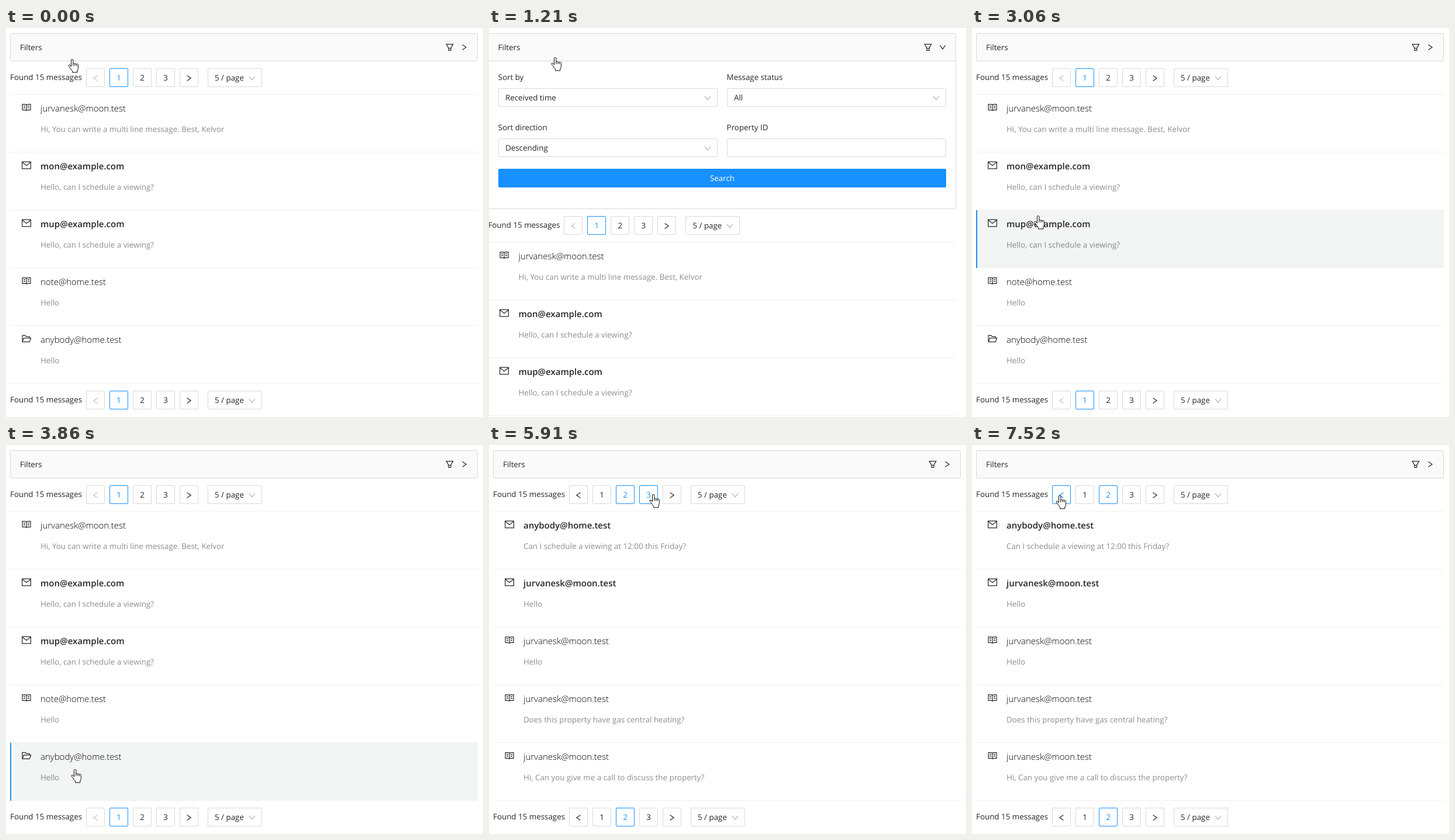
An HTML page for the animation above (8000 ms loop, 816 by 666 pixels).

```html
<!DOCTYPE html>
<html lang="en">
<head>
<meta charset="utf-8">
<title>Messages</title>
<style>
  html, body { margin: 0; width: 100%; height: 100%; overflow: hidden; background: #fff; }
  body { position: relative; font: 13.36px/20px "Open Sans", "Noto Sans", sans-serif; color: rgba(0,0,0,.85); text-rendering: geometricPrecision; }
  div, svg { position: absolute; box-sizing: border-box; white-space: nowrap; }
  svg { fill: none; stroke: currentColor; stroke-width: 1.2; overflow: visible; }
  #list { left: 0; top: 0; width: 816px; height: 666px; }
  #panel { left: 7px; top: 9px; width: 800px; height: 48px; border: 1px solid #d9d9d9; border-radius: 2px; background: #fff; overflow: hidden; }
  .head { left: 0; top: 0; width: 100%; height: 47px; background: #fafafa; border-bottom: 1px solid #d9d9d9; }
  .box { height: 32px; border: 1px solid #d9d9d9; border-radius: 2px; background: #fff; line-height: 30px; }
  .btn { width: 32px; text-align: center; }
  .btn svg { left: 8px; top: 9px; }
  .off { color: rgba(0,0,0,.25); }
  .on { color: #1890ff; border-color: #1890ff; }
  .drop { color: rgba(0,0,0,.28); }
  .search { background: #1890ff; border-color: #1890ff; color: #fff; text-align: center; }
  .line { left: 7px; width: 800px; height: 1px; background: #f0f0f0; }
  .row { left: 7px; width: 800px; height: 99px; border-bottom: 1px solid #f0f0f0; }
  .row svg { left: 20px; top: 14px; }
  .hover { background: #f3f5f4; }
  .hover::before { content: ""; position: absolute; left: 0; top: 0; width: 2px; height: 99px; background: #1890ff; }
  .title { left: 52px; top: 14px; font-size: 15px; font-weight: 300; color: #000; }
  .mail .title { font-weight: 600; color: rgba(0,0,0,.85); }
  .note { left: 52px; top: 49px; color: rgba(0,0,0,.45); }
  #cursor { left: 0; top: 0; color: #000; stroke-width: 1; }
  #cursor path { fill: #fff; }
</style>
</head>
<body>
<div id="list"></div>
<div id="panel"></div>
<svg id="cursor" width="20" height="26">
  <g id="hand" transform="translate(-7 -1)">
    <path d="M5.5 13V2.3a1.7 1.7 0 0 1 3.4 0V8.4a1.6 1.6 0 0 1 3 .4a1.5 1.5 0 0 1 2.8.7a1.4 1.4 0 0 1 2.7 1V15.5q0 2.5-1.6 4.6V23H7.6V20.6Q5.5 18.5 4 15.6L1.3 12.4q-.9-1.6.3-2.2q1.2-.5 2.4.9z"/>
    <path d="M8.9 8.4v3.4M11.9 8.8v3M14.7 9.5v2.3"/>
  </g>
  <path id="arrow" d="M.5.5V16.5l3.7-3.6 2.4 5.6 2.6-1.1-2.4-5.5h5.2z"/>
</svg>
<script>
const $ = id => document.getElementById(id);

const shapes = {
  read: 'M1 2.7h4.5q2 0 2.5 1q.5-1 2.5-1H15v9.6h-4.6q-1.9 0-2.4.9q-.5-.9-2.4-.9H1zM8 3.7v9M3 5.7h3M3 8.6h3M10 5.7h3M10 8.6h3',
  mail: 'M.6 2.1h14.8v11.8H.6zM1 3l7 5.5L15 3',
  folder: 'M1 13.4V2.4h4.8l2 2h5.4v2.4M1 13.4L3.4 6.8H15.6L13.2 13.4z',
  funnel: 'M1.2 1.8h11.6L9 8.2v4.2H5V8.2zM5 8.6h4',
  next: 'M3.6 2.4l6.6 4.6-6.6 4.6',
  prev: 'M10.4 2.4l-6.6 4.6 6.6 4.6',
  down: 'M2 4l5 6 5-6'
};
const icon = (name, attrs = '', size = 14) =>
  `<svg width="${size}" height="${size}" ${attrs}><path d="${shapes[name]}"/></svg>`;
const at = (x, y) => `style="left:${x}px;top:${y}px"`;
const text = (x, baseline, s) => `<div ${at(x, baseline - 15)}>${s}</div>`;

const jurvan = 'jurvanesk@moon.test';
const anybody = 'anybody@home.test';
const viewing = 'Hello, can I schedule a viewing?';
const pages = [
  [
    ['read', jurvan, 'Hi, You can write a multi line message. Best, Kelvor'],
    ['mail', 'mon@example.com', viewing],
    ['mail', 'mup@example.com', viewing],
    ['read', 'note@home.test', 'Hello'],
    ['folder', anybody, 'Hello']
  ], [
    ['mail', anybody, 'Can I schedule a viewing at 12:00 this Friday?'],
    ['mail', jurvan, 'Hello'],
    ['read', jurvan, 'Hello'],
    ['read', jurvan, 'Does this property have gas central heating?'],
    ['read', jurvan, 'Hi, Can you give me a call to discuss the property?']
  ], [
    ['read', jurvan, 'Hello'],
    ['read', jurvan, 'Hello, Can you give me a call to discuss the property? Does this property have gas central heating?'],
    ['read', jurvan, viewing],
    ['read', jurvan, 'Hello'],
    ['read', jurvan, 'Hello']
  ]
];

const rowTop = i => 114 + 99 * i;
const btnLeft = i => 137 + 40 * i;

function pager(y) {
  const labels = [icon('prev'), 1, 2, 3, icon('next')];
  return text(7, y + 20, 'Found 15 messages') +
    labels.map((s, i) => `<div class="box btn" ${at(btnLeft(i), y)}>${s}</div>`).join('') +
    `<div class="box" style="left:345px;top:${y}px;width:93px;padding-left:11px">5 / page` +
    icon('down', 'class="drop" style="left:68px;top:9px"') + '</div>';
}

function rows(list) {
  return '<div class="page">' + list.map(([kind, from, note], i) =>
    `<div class="row ${kind}" style="left:7px;top:${rowTop(i)}px">${icon(kind, '', 16)}` +
    `<div class="title">${from}</div><div class="note">${note}</div></div>`).join('') + '</div>';
}

function field(x, y, label, value) {
  return text(x - .4, y, label) +
    `<div class="box" style="left:${x}px;top:${y + 14}px;width:375px;padding-left:11px">${value}` +
    (value && icon('down', 'class="drop" style="left:350px;top:9px"')) + '</div>';
}

$('list').innerHTML = pager(69) + '<div class="line" style="top:113px"></div>' +
  pages.map(rows).join('') + pager(621);

$('panel').innerHTML = '<div class="head"></div>' + text(16, 28, 'Filters') +
  icon('funnel', at(744, 16)) + icon('next', 'id="caret" ' + at(769, 16)) +
  field(16.4, 79, 'Sort by', 'Received time') + field(407.4, 79, 'Message status', 'All') +
  field(16.4, 165, 'Sort direction', 'Descending') + field(407.4, 165, 'Property ID', '') +
  '<div class="box search" style="left:16.4px;top:231px;width:766px">Search</div>';

const pageEls = [...document.querySelectorAll('.page')];
const buttons = [...document.querySelectorAll('.btn')];

const loop = 8000, tick = 203;
const path = [
  [0, 113, 54], [1, 113, 54], [2, 113, 51], [10, 113, 51], [11, 113, 66], [13, 113, 180],
  [15, 113, 322], [16, 113, 440], [17, 114, 540], [18, 116, 560], [19, 118, 556],
  [20, 150, 530], [23, 205, 104], [24, 226, 84], [25, 231, 82], [27, 233, 80],
  [28, 262, 84], [29, 281, 85], [30, 281, 85], [31, 282, 86], [33, 282, 86],
  [36, 152, 86], [37, 150, 87], [40, 150, 87]
];

const ease = p => {
  p = Math.min(1, Math.max(0, p));
  return p * p * (3 - 2 * p);
};

function cursorAt(k) {
  const i = path.findIndex((p, n) => n && p[0] >= k);
  const [a, ax, ay] = path[i - 1], [b, bx, by] = path[i];
  const f = (k - a) / (b - a);
  return [Math.round(ax + (bx - ax) * f), Math.round(ay + (by - ay) * f)];
}

function draw(k) {
  const [x, y] = cursorAt(k);
  const open = ease((k - 2) / 4) - ease((k - 7) / 3);
  const page = k < 26 ? 0 : k < 32 || k > 36 ? 1 : 2;
  const drop = Math.round(253 * open);

  $('panel').style.left = (open ? -1.4 : 7) + 'px';
  $('panel').style.height = 48 + drop + 'px';
  $('caret').style.transform = `rotate(${90 * open}deg)`;
  $('list').style.left = (open ? -8.6 : 0) + 'px';
  $('list').style.top = drop + 'px';

  let pointing = y > 9 && y < 57;
  buttons.forEach((el, n) => {
    const i = n % 5;
    const off = i === 0 && page === 0;
    const over = n < 5 && y >= 69 && y < 101 && x >= btnLeft(i) && x < btnLeft(i) + 32;
    pointing = pointing || over;
    el.classList.toggle('off', off);
    el.classList.toggle('on', i === page + 1 || (over && !off));
  });
  pageEls.forEach((el, n) => {
    el.style.display = n === page ? 'block' : 'none';
    [...el.children].forEach((row, i) => {
      const over = !open && y >= rowTop(i) && y < rowTop(i + 1);
      pointing = pointing || over;
      row.classList.toggle('hover', over);
    });
  });

  $('cursor').style.transform = `translate(${x}px, ${y}px)`;
  $('hand').style.display = pointing ? '' : 'none';
  $('arrow').style.display = pointing ? 'none' : '';
}

let last = -1;
const start = performance.now();
function frame() {
  const t = (performance.now() - start) % loop;
  const k = Math.floor((t + 10) / tick);
  if (k !== last) draw(last = k);
  requestAnimationFrame(frame);
}
frame();
</script>
</body>
</html>
```
